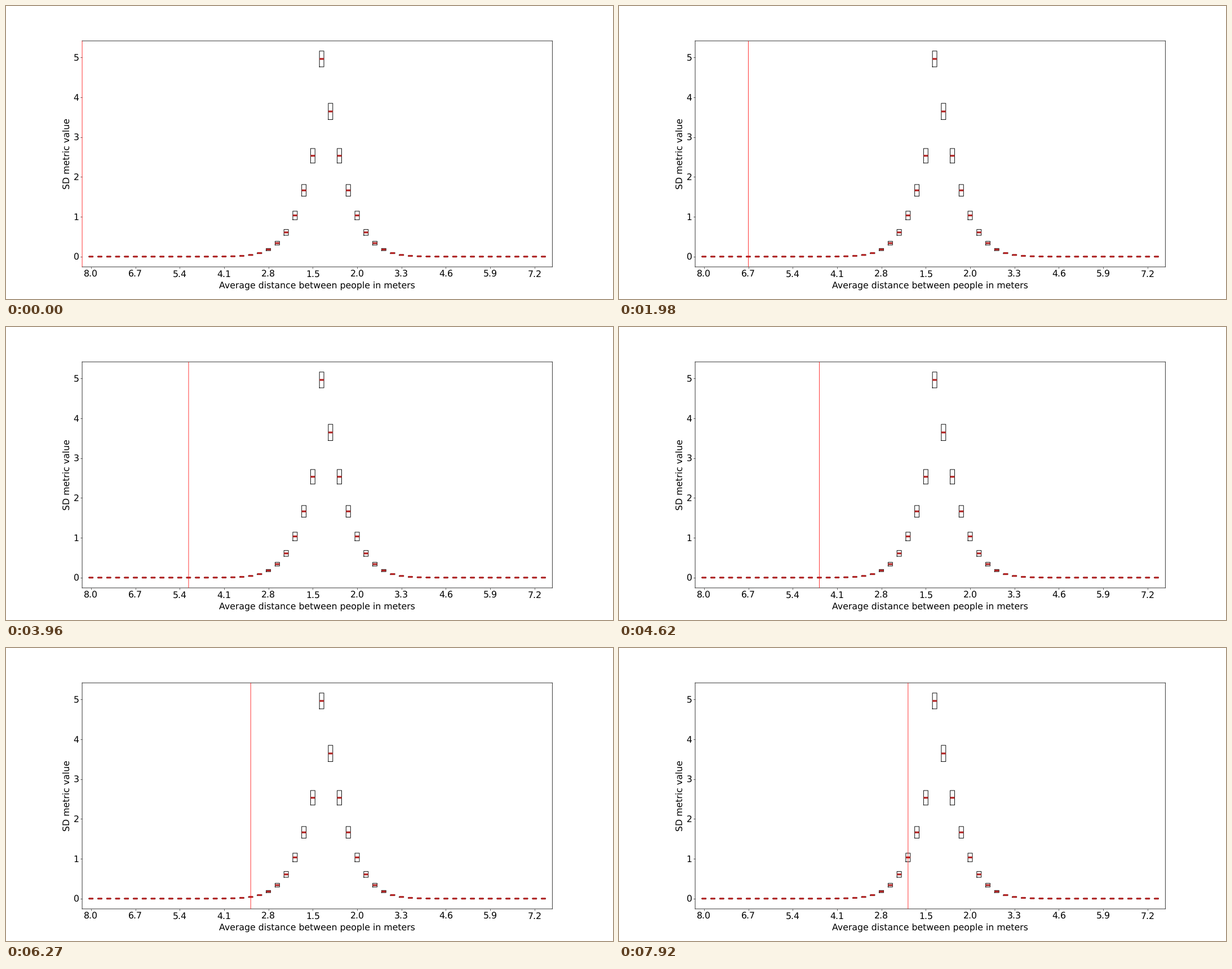
A matplotlib script that plays this animation: 1077 px wide and 520 px high, repeating every 8000 ms.

```python
import numpy as np
import matplotlib.pyplot as plt
from matplotlib.animation import FuncAnimation

W, H, DPI = 1077, 520, 56.5
LOOP_MS, TICK_MS, STEP_MS = 8000, 40, 330
COUNT, PEAK = 52, 27

plt.rcParams.update({"font.family": "DejaVu Sans", "font.size": 20,
                     "text.hinting": "none", "axes.linewidth": 1})


def steps_away(pos):
    """Spacing steps from the closest setup: first shrinking, then growing."""
    return np.where(pos < PEAK, PEAK + 1 - pos, pos - PEAK)


def with_gaps(*columns):
    """Lay the columns out as one path per row, parted by NaN."""
    return np.column_stack(columns + (np.full(COUNT, np.nan),)).ravel()


pos = np.arange(1, COUNT + 1)
k = steps_away(pos)
median = 4.959 * np.exp(-0.281 * k - 0.0278 * k**2)
half = median * (0.04 + 0.016 * k)
low, high = median - half, median + half
left, right = pos - 0.25, pos + 0.25

fig = plt.figure(figsize=(W / DPI, H / DPI), dpi=DPI, facecolor="white")
x0, x1, y0, y1 = 135.1 / W, 969.34 / W, 57 / H, 458.05 / H
ax = fig.add_axes([x0, y0, x1 - x0, y1 - y0])
ax.set_xlim(0, COUNT + 1)
ax.set_ylim(-0.2577, 5.411)

ax.plot(with_gaps(left, right, right, left, left),
        with_gaps(low, low, high, high, low),
        color="black", lw=1.2, snap=False)
ax.plot(with_gaps(left, right), with_gaps(median, median),
        color="firebrick", lw=4, snap=False, solid_capstyle="butt")

ticks = pos[::5]
ax.set_xticks(ticks, [f"{0.98 + 0.26 * n:.1f}" for n in steps_away(ticks)])
ax.set_yticks(range(6))
ax.tick_params(axis="x", pad=4)
ax.set_xlabel("Average distance between people in meters", labelpad=5)
ax.set_ylabel("SD metric value")
for spine in ax.spines.values():
    spine.set_snap(False)

marker = ax.axvline(0, color="red", lw=1, zorder=10, snap=False)


def update(i):
    step = (i * TICK_MS + TICK_MS - 10) // STEP_MS
    marker.set_xdata([step, step])
    # At the start the marker lies on the left edge of the plot.
    marker.set_visible(step > 0)
    ax.spines["left"].set_color("black" if step else "red")
    return marker, ax.spines["left"]


anim = FuncAnimation(fig, update, frames=LOOP_MS // TICK_MS, interval=TICK_MS,
                     repeat=True, repeat_delay=0, blit=False)
plt.show()
```
